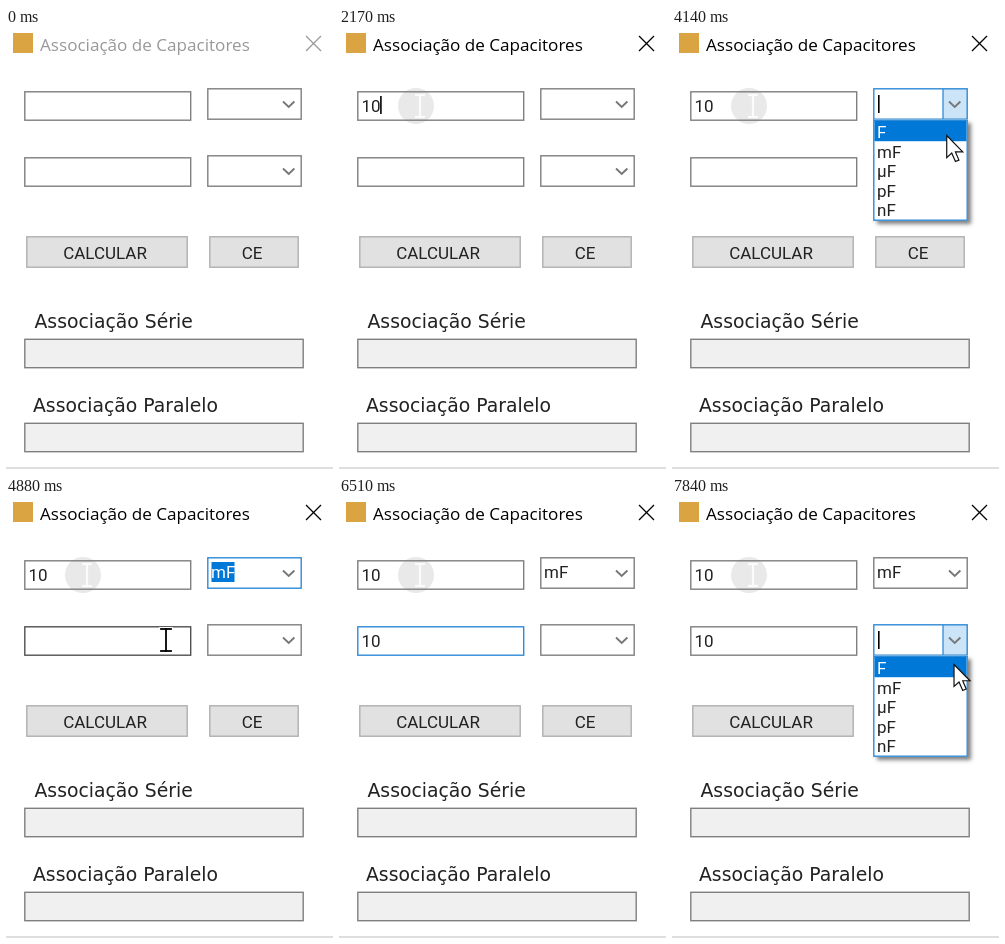
Write an HTML page with a canvas that moves like this. It is 327 px wide and 441 px high and loops after 8 s.

```html
<!DOCTYPE html>
<html lang="pt">
<head>
<meta charset="utf-8">
<title>Associação de Capacitores</title>
<style>
html, body { margin: 0; width: 100%; height: 100%; overflow: hidden; background: #fff; }
canvas { display: block; width: 327px; height: 441px; }
</style>
</head>
<body>
<canvas id="stage"></canvas>
<script>
const W = 327, H = 441, LOOP = 8000, TICK = 68, ROW = 19.6;
const canvas = document.getElementById('stage');
const ctx = canvas.getContext('2d');
const dpr = window.devicePixelRatio || 1;
canvas.width = W * dpr;
canvas.height = H * dpr;

const GREY = '#7f7f7f', DARK = '#505050', BLUE = '#0078d7', FOCUS = '#2f8ad6', INK = '#222';
const UI = '17px Roboto, sans-serif';
const UNITS = ['F', 'mF', 'µF', 'pF', 'nF'];

const FIELD1 = { x: 18, y: 63, w: 167.5, h: 30 };
const FIELD2 = { ...FIELD1, y: 129 };
const COMBO1 = { x: 201, y: 60, w: 95, h: 32 };
const COMBO2 = { ...COMBO1, y: 127 };

// Moments of the user's actions, in ms
const FOCUS1 = 1280, TYPE1 = 1965, FOCUS_COMBO1 = 3600, PICK1 = 4535;
const FOCUS2 = 5000, TYPE2 = 5755, FOCUS_COMBO2 = 7510;

// Pointer gestures: bend pushes the middle of the path sideways
const GESTURES = [
  { start: 400, end: 1150, from: [180, 399], to: [80, 79], bend: [-25, -30] },
  { start: 2715, end: 3470, from: [86, 80], to: [281, 79], bend: [0, 90] },
  { start: 3680, end: 4340, from: [281, 79], to: [272, 120], bend: [0, 0] },
  { start: 4600, end: 4880, from: [272, 120], to: [160, 143], bend: [0, 20] },
  { start: 6775, end: 7510, from: [168, 150], to: [283, 142], bend: [140, 40] },
  { start: 7600, end: 7840, from: [283, 142], to: [282, 168], bend: [0, 0] }
];

const within = (t, a, b) => t >= a && t < b;
const clamp = v => Math.max(0, Math.min(1, v));

function pointerAt(t) {
  const g = GESTURES.filter(m => m.start <= t).pop() || GESTURES[0];
  const sampled = g.start + Math.floor((t - g.start) / TICK + 0.1) * TICK;
  const k = clamp((sampled - g.start) / (g.end - g.start - TICK / 4));
  const ease = k * k * (3 - 2 * k);
  return g.from.map((a, i) => a + (g.to[i] - a) * ease + g.bend[i] * 2 * ease * (1 - ease));
}

function text(str, x, y, font, color = INK) {
  ctx.font = font;
  ctx.fillStyle = color;
  ctx.fillText(str, x, y);
}

function frame({ x, y, w, h }, stroke) {
  ctx.strokeStyle = stroke;
  ctx.lineWidth = 1.4;
  ctx.strokeRect(x + 0.8, y + 0.8, w - 1.6, h - 1.6);
}

function box(rect, fill, stroke) {
  ctx.fillStyle = fill;
  ctx.fillRect(rect.x + 0.5, rect.y + 0.5, rect.w - 1, rect.h - 1);
  frame(rect, stroke);
}

function line(points, color, width) {
  ctx.beginPath();
  points.forEach(([x, y]) => ctx.lineTo(x, y));
  ctx.strokeStyle = color;
  ctx.lineWidth = width;
  ctx.stroke();
}

function caret(x, y) {
  ctx.fillStyle = '#000';
  ctx.fillRect(x, y, 1.6, 18);
}

function titleBar(active) {
  const color = active ? '#000' : '#999';
  ctx.fillStyle = '#d9a441';
  ctx.fillRect(7, 5, 20, 20);
  text('Associação de Capacitores', 34, 22.5, '17.1px "Open Sans", sans-serif', color);
  line([[300, 8], [315, 23]], color, 1.2);
  line([[315, 8], [300, 23]], color, 1.2);
}

function field(rect, value, stroke, withCaret) {
  frame(rect, stroke);
  text(value, 22.5, rect.y + 21, UI);
  if (withCaret) caret(22.5 + ctx.measureText(value).width - 0.5, rect.y + 5);
}

function combo(rect, { value = '', stroke, selected, hot, open }) {
  const { y } = rect;
  if (hot || open) {
    ctx.fillStyle = open ? '#cce4f7' : '#f2f8fd';
    ctx.fillRect(271, y + 1, 24, 30);
    line([[271, y + 1], [271, y + 31]], open ? FOCUS : '#a9d5f3', 1.3);
  }
  frame(rect, stroke);
  if (selected) {
    ctx.fillStyle = BLUE;
    ctx.fillRect(205.5, y + 5, 23, 20);
  }
  text(value, 205, y + 21, UI, selected ? '#fff' : INK);
  if (open) caret(206, y + 7);
  line([[277, y + 13.5], [282.7, y + 19], [288.4, y + 13.5]], '#777', 1.9);
}

function dropList({ x, y, w, h }, hoverY) {
  const list = { x, y: y + h - 0.5, w, h: UNITS.length * ROW + 3.5 };
  ctx.save();
  ctx.shadowColor = 'rgba(0,0,0,0.5)';
  ctx.shadowBlur = 4 * dpr;
  ctx.shadowOffsetX = ctx.shadowOffsetY = 3 * dpr;
  ctx.fillStyle = '#fff';
  ctx.fillRect(list.x + 1, list.y, list.w - 1, list.h);
  ctx.restore();
  box(list, '#fff', FOCUS);
  const hover = Math.floor((hoverY - list.y) / ROW);
  UNITS.forEach((unit, i) => {
    const top = list.y + 1.5 + i * ROW;
    if (i === hover) {
      ctx.fillStyle = BLUE;
      ctx.fillRect(list.x + 1.5, top, list.w - 3, ROW + 0.6);
    }
    text(unit, 205, top + 17, UI, i === hover ? '#fff' : INK);
  });
}

function button(label, x, w) {
  box({ x, y: 208, w, h: 32 }, '#e1e1e1', '#b0b0b0');
  ctx.textAlign = 'center';
  text(label, x + w / 2 - 2, 230.5, UI);
  ctx.textAlign = 'left';
}

function output(label, x, y) {
  text(label, x, y - 11, '18.8px "DejaVu Sans", sans-serif');
  box({ x: 18, y, w: 280, h: 30 }, '#f0f0f0', GREY);
}

function beamShape(x, y, color, width) {
  for (const end of [-11, 11]) line([[x - 5, y + end], [x + 5, y + end]], color, width);
  line([[x, y - 11], [x, y + 11]], color, width);
}

function beam(x, y) {
  ctx.lineCap = 'square';
  beamShape(x, y, '#fff', 3.8);
  beamShape(x, y, '#000', 1.8);
  ctx.lineCap = 'butt';
}

function arrow(x, y) {
  const shape = [[0, 0], [0, 22], [5, 17.5], [8.7, 26], [12.2, 24.5], [8.7, 16.3], [16, 16.3]];
  ctx.beginPath();
  shape.forEach(([dx, dy]) => ctx.lineTo(x + dx, y + dy));
  ctx.closePath();
  ctx.fillStyle = '#fff';
  ctx.fill();
  ctx.strokeStyle = '#111';
  ctx.lineWidth = 1.2;
  ctx.stroke();
}

function halo(t) {
  ctx.globalAlpha = clamp((t - 1190) / 280);
  ctx.fillStyle = '#e9e9e9';
  ctx.beginPath();
  ctx.arc(77, 78, 18, 0, Math.PI * 2);
  ctx.fill();
  beamShape(81, 78, '#fbfbfb', 2.2);
  ctx.globalAlpha = 1;
}

const typed = (t, start) => '10'.slice(0, t < start ? 0 : t < start + 200 ? 1 : 2);

function draw(t) {
  const [px, py] = pointerAt(t);
  // The pointer hides while typing
  const shown = within(t, 400, TYPE1 + 60) || within(t, 2715, TYPE2) || t >= 6775;
  const over = r => shown && px >= r.x && px < r.x + r.w && py >= r.y && py < r.y + r.h;
  const border = (r, focused) => focused ? FOCUS : over(r) ? DARK : GREY;
  const open1 = within(t, FOCUS_COMBO1 + 60, PICK1), open2 = t >= FOCUS_COMBO2 + 60;

  ctx.setTransform(dpr, 0, 0, dpr, 0, 0);
  ctx.fillStyle = '#fff';
  ctx.fillRect(0, 0, W, H);
  titleBar(t >= FOCUS1);
  if (t >= 1190) halo(t);

  const stroke1 = within(t, FOCUS1, 2780) ? GREY : border(FIELD1, within(t, 2780, FOCUS_COMBO1));
  field(FIELD1, typed(t, TYPE1), stroke1, within(t, FOCUS1, FOCUS_COMBO1));
  field(FIELD2, typed(t, TYPE2), border(FIELD2, within(t, FOCUS2, FOCUS_COMBO2)), within(t, FOCUS2, 6505));

  combo(COMBO1, {
    value: t >= PICK1 ? 'mF' : '',
    stroke: border(COMBO1, within(t, FOCUS_COMBO1, 5355)),
    selected: within(t, PICK1, FOCUS2),
    hot: over(COMBO1) && px > 270,
    open: open1
  });
  combo(COMBO2, {
    stroke: border(COMBO2, t >= FOCUS_COMBO2),
    hot: over(COMBO2) && px > 270,
    open: open2
  });

  button('CALCULAR', 20, 162);
  button('CE', 203, 90);
  output('Associação Série', 28.5, 310.5);
  output('Associação Paralelo', 27, 394.5);
  line([[0, 440], [W, 440]], '#bdbdbd', 1.2);

  if (open1) dropList(COMBO1, py);
  if (open2) dropList(COMBO2, py);

  if (shown) {
    const onEdit = !open1 && !open2 && px < 270 && (over(COMBO1) || over(COMBO2));
    (over(FIELD1) || over(FIELD2) || onEdit ? beam : arrow)(px, py);
  }
}

const start = performance.now();
function tick() {
  draw((performance.now() - start) % LOOP);
  requestAnimationFrame(tick);
}
tick();
</script>
</body>
</html>
```
